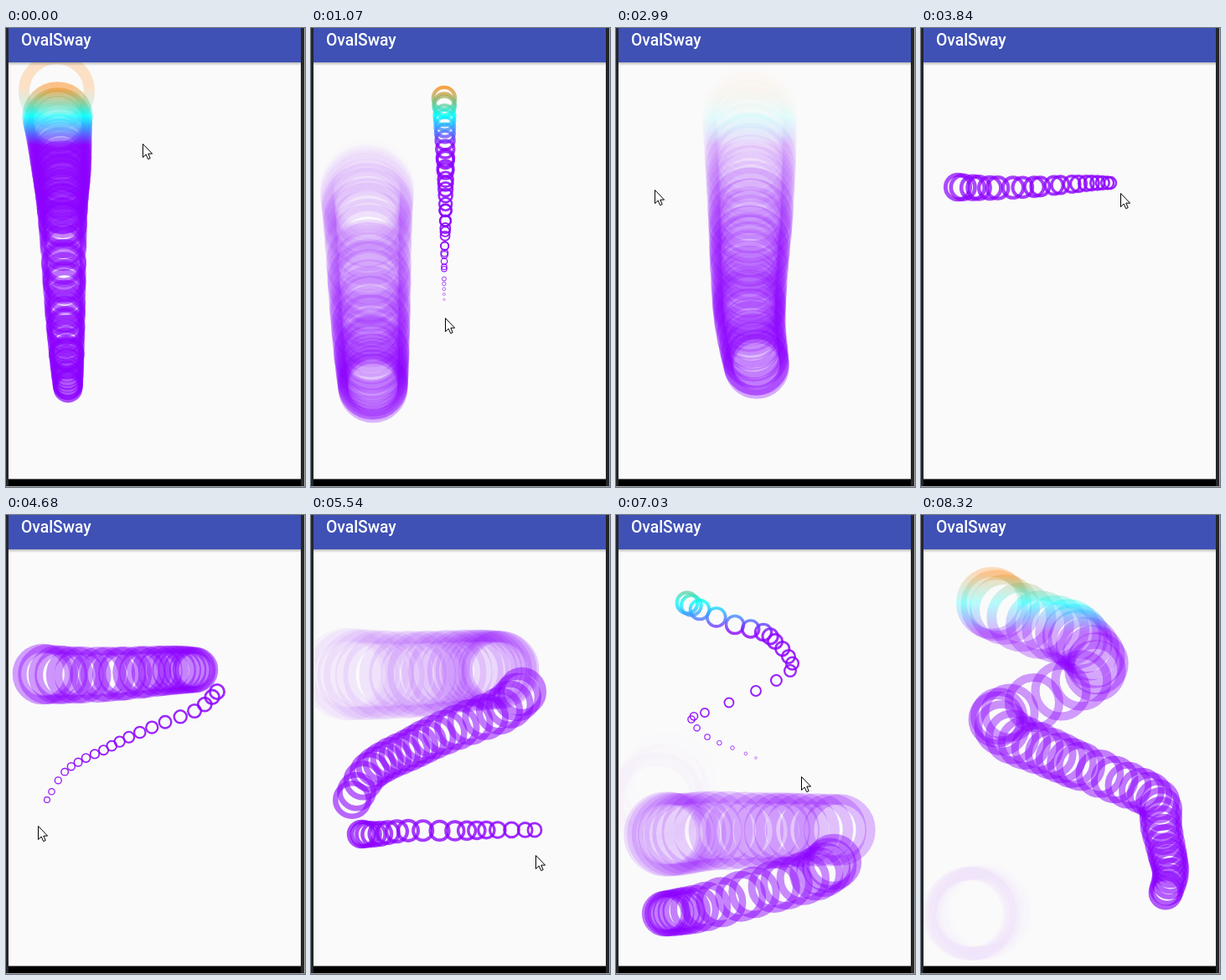
Recreate the animation shown at these times as an HTML page. Size 357 px wide and 548 px high, loop 8420 ms.

```html
<!DOCTYPE html>
<html lang="en">
<head>
<meta charset="utf-8">
<title>OvalSway</title>
<style>
  html, body { margin: 0; width: 100%; height: 100%; overflow: hidden; background: #fafafa; }
  svg { display: block; width: 100vw; height: 100vh; }
  text { font: 500 19.3px Roboto, sans-serif; fill: #fff; }
</style>
</head>
<body>
<svg viewBox="0 0 357 548">
  <defs>
    <linearGradient id="hue" gradientUnits="userSpaceOnUse" x1="0" y1="70" x2="0" y2="140">
      <stop offset="0" stop-color="#ff7f00"/>
      <stop offset=".5" stop-color="#00ffff"/>
      <stop offset="1" stop-color="#8b00ff"/>
    </linearGradient>
    <linearGradient id="shade" x1="0" y1="0" x2="0" y2="1">
      <stop offset="0" stop-color="#000" stop-opacity=".25"/>
      <stop offset="1" stop-color="#000" stop-opacity="0"/>
    </linearGradient>
  </defs>
  <rect width="357" height="548" fill="#fafafa"/>
  <g id="rings" fill="none" stroke="url(#hue)"></g>
  <rect y="41" width="357" height="4" fill="url(#shade)"/>
  <rect width="357" height="41" fill="#3f51b5"/>
  <text x="18" y="21.2">OvalSway</text>
  <rect y="538.5" width="357" height="10" fill="#000"/>
  <rect width="3" height="548" fill="#25262a"/>
  <rect x="352" width="5" height="548" fill="#25262a"/>
  <path d="M356.5 0V547.5H0" fill="none" stroke="#aaa"/>
  <path id="arrow" d="M.5 .5V16.5L4.2 13L6.7 18.6L9.2 17.5L6.8 12.1H11.6Z" fill="#fff" stroke="#000"/>
</svg>
<script>
const LOOP = 8420, STEP = 213.1;   // ms
const LIFE = 2.57, GROWTH = 19.2;  // seconds, px per second

// Pointer moves: start and end in seconds, key points evenly spaced in time,
// rings left behind (none while hovering), unevenness of their spacing.
const moves = [
  move(-2.03, -2.03, '60.5,75.5', 1),
  move(-1.88, -.78, '61.5,106 66,166 67.5,225 71,352 74,430', 66, .012),
  move(0, 0, '163,138'),
  move(.38, 1.25, '159,84 160.5,160 160.5,230 159,288 160,350 168,404', 52, .012),
  move(1.7, 1.92, '253,200 241,131'),
  move(2.14, 2.14, '241,122'),
  move(2.98, 2.98, '46,193'),
  move(3.07, 3.47, '44,190 80,191 128,190 172,187 206,185 226,185', 20, .012),
  move(4.24, 4.51, '252,211 229,232 183,250 145,266 118,280 90,293 68,309 49,340', 20),
  move(4.69, 4.69, '38,371'),
  move(4.77, 5.12, '60,381 78,381 113,377 175,377 217,376 267,376', 18),
  move(5.54, 5.54, '268,406'),
  move(5.55, 5.82, '260,414 235,430 170,449 105,468 74,474 58,476', 18, .012),
  move(6.39, 6.96, '85,105 100,113 142,131 176,140 190,151 206,169 208,186 ' +
    '167,210 106,236 90,244 109,265 139,278 167,290', 25),
  move(6.98, 7.4, '180,296 236,318 281,340 287,373 294,405 298,428 292,451', 21, .008),
  move(7.6, 7.6, '296,470')
];

function move(from, to, path, count = 0, jitter = 0) {
  const pts = path.split(' ').map(p => p.split(',').map(Number));
  return { from, to, pts, count, jitter };
}

const mix = (a, b, k) => a + (b - a) * k;

// Smooth curve through the key points, u from 0 to 1.
function along(pts, u) {
  const last = pts.length - 1;
  const s = Math.max(0, Math.min(1, u)) * last;
  const i = Math.min(Math.floor(s), Math.max(0, last - 1)), k = s - i;
  const at = j => pts[Math.max(0, Math.min(last, j))];
  const a = at(i - 1), b = at(i), c = at(i + 1), d = at(i + 2);
  return b.map((p, n) => p + k / 2 * (c[n] - a[n]
    + k * (2 * a[n] - 5 * p + 4 * c[n] - d[n]
    + k * (3 * (p - c[n]) + d[n] - a[n]))));
}

let seed = 7;
function random() {
  seed = seed * 16807 % 2147483647;
  return seed / 2147483647;
}

const layer = document.getElementById('rings');
const arrow = document.getElementById('arrow');
const rings = [];

for (const { from, to, pts, count, jitter } of moves) {
  for (let i = 0; i < count; i++) {
    const inner = i > 0 && i < count - 1;
    const u = i / Math.max(1, count - 1) + (inner ? jitter * (2 * random() - 1) : 0);
    const [x, y] = along(pts, u);
    const el = document.createElementNS('http://www.w3.org/2000/svg', 'circle');
    el.setAttribute('cx', x);
    el.setAttribute('cy', y);
    layer.append(el);
    rings.push({ el, born: mix(from, to, u) });
  }
}

function drawRing({ el, born }, t) {
  const age = t - born;
  const on = age > .06 && age < LIFE;
  el.style.display = on ? '' : 'none';
  if (!on) return;
  const r = age * GROWTH;
  el.setAttribute('r', r);
  el.setAttribute('stroke-width', r / 3);
  el.setAttribute('opacity', 1 - age / LIFE);
}

function drawArrow(t) {
  const i = moves.findIndex(m => m.from > t);
  arrow.style.display = i < 0 ? 'none' : '';
  if (i < 0) return;
  const now = moves[i - 1], next = moves[i];
  let [x, y] = along(now.pts, (t - now.from) / (now.to - now.from || 1));
  if (t > now.to) {
    const k = (t - now.to) / (next.from - now.to);
    const [endX, endY] = now.pts[now.pts.length - 1];
    x = mix(endX, next.pts[0][0], k);
    y = mix(endY, next.pts[0][1], k);
  }
  arrow.setAttribute('transform', `translate(${Math.round(x)} ${Math.round(y)})`);
}

function draw(ms) {
  // The picture advances in discrete steps.
  const t = Math.floor((ms % LOOP + 9) / STEP) * STEP / 1000;
  for (const ring of rings) drawRing(ring, t);
  drawArrow(t);
}

const start = performance.now();
function tick() {
  draw(performance.now() - start);
  requestAnimationFrame(tick);
}
tick();
</script>
</body>
</html>
```
